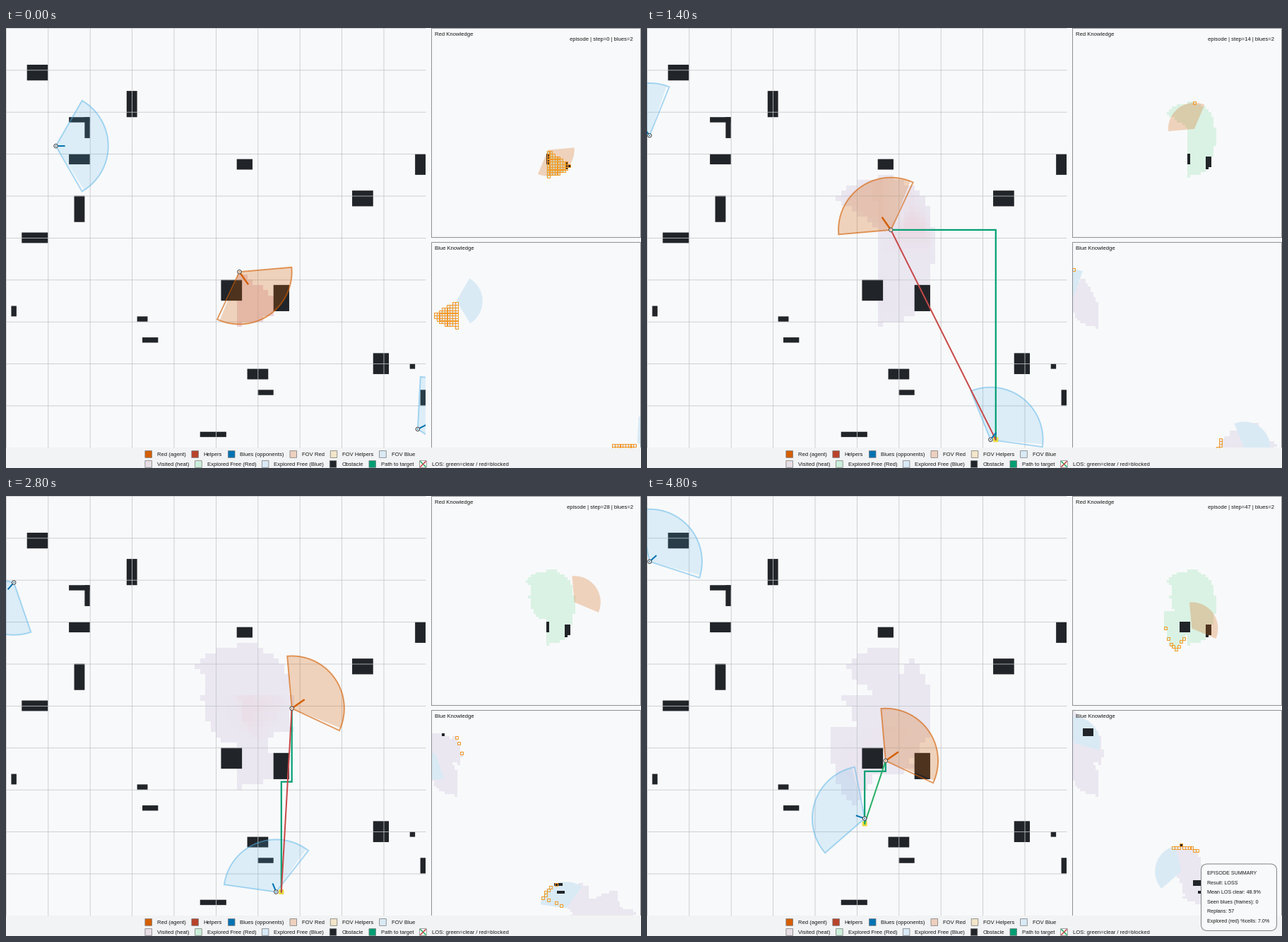
A matplotlib script for the animation above (4900 ms loop, 899 by 623 pixels).

```python
import numpy as np
import matplotlib.pyplot as plt
from matplotlib.animation import FuncAnimation
from matplotlib.colors import to_rgba
from matplotlib.patches import Circle, FancyBboxPatch, Polygon, Rectangle

W, H, DPI = 899, 623, 100
PX = 72 / DPI                     # points per pixel
N, LAST, FRAMES = 80, 47, 49
MAP = 594
CELL, MINI = MAP / N, 297 / N
RANGE = 10
PANEL_X, RED_Y, BLUE_Y = 602.3, 0, 303.2

BG, BAR, GRID, DARK = "#f8f9fa", "#f2f3f4", "#c3c6c9", "#212529"
RED, BLUE, SKY, PATH = "#d55e00", "#0072b2", "#56b4e9", "#009e73"
CLEAR, BLOCKED, ORANGE = "#27b066", "#c94848", "#f39a26"
FRAME = "#808488"
COOL = np.array([234, 232, 242]) / 255
WARM = np.array([235, 213, 221]) / 255

# x, y, width, height in cells
BLOCKS = [
    (4, 7, 4, 3), (23, 12, 2, 5), (12, 17, 4, 1), (15, 17, 1, 4),
    (12, 24, 4, 2), (13, 32, 2, 5), (3, 39, 5, 2), (1, 53, 1, 2),
    (25, 55, 2, 1), (26, 59, 3, 1), (44, 25, 3, 2), (66, 31, 4, 3),
    (78, 24, 2, 4), (41, 48, 4, 4), (51, 49, 3, 5), (46, 65, 4, 2),
    (48, 69, 3, 1), (70, 62, 3, 4), (77, 64, 1, 1), (79, 69, 1, 3),
    (37, 77, 5, 1),
]
walls = np.zeros((N, N), bool)
for bx, by, bw, bh in BLOCKS:
    walls[by:by + bh, bx:bx + bw] = True

# ---------- simulation ----------
MOVES = {"U": (0, -1), "D": (0, 1), "L": (-1, 0), "R": (1, 0)}


def walk(start, heading, plan):
    """Each action is a one-cell move, a 45 degree turn (T) or a wait (.)."""
    pos, head = [np.array(start)], [heading]
    for word in plan.split():
        for _ in range(int(word[1:])):
            pos.append(pos[-1] + MOVES.get(word[0], (0, 0)))
            head.append(head[-1] + 45 * (word[0] == "T"))
    return np.array(pos), np.array(head)


def patrol(*poses):
    """Glide through (step, x, y, heading) poses, turning early in each leg."""
    k, t = np.array(poses), np.arange(LAST + 1)
    i = np.clip(np.searchsorted(k[:, 0], t, "right") - 1, 0, len(k) - 2)
    a, b = k[i], k[i + 1]
    u = (t - a[:, 0]) / (b[:, 0] - a[:, 0])
    pos = a[:, 1:3] + (b - a)[:, 1:3] * u[:, None]
    return np.round(pos).astype(int), a[:, 3] + (b - a)[:, 3] * np.minimum(1, u / 0.7)


red_pos, red_dir = walk((44, 46), 55, "U2 T2 U6 T2 R3 T2 R7 .2 D6 L9 D6")
tracks = [
    patrol((0, 9, 22, 0), (3, 9, 22, -90), (8, 2, 24, -65), (14, 0, 20, -128),
           (22, 0, 20, -66), (28, 1, 16, -229), (36, 0, 10, -130),
           (LAST, 0, 12, -42)),
    patrol((0, 78, 76, -27), (8, 70, 79, -110), (14, 65, 78, -52),
           (22, 57, 76.4, -123), (28, 51, 75, -112), (36, 43.5, 71, -156),
           (LAST, 41, 61, -161)),
]
YY, XX = np.mgrid[:N, :N]


def seen(pos, heading):
    dx, dy = XX - pos[0], YY - pos[1]
    off = np.degrees(np.arctan2(dy, dx)) - (120 - heading)
    off = (off + 180) % 360 - 180
    return (np.hypot(dx, dy) <= RANGE) & (np.abs(off) <= 30)


def explore(*team):
    known, out = np.zeros((N, N), bool), []
    for s in range(LAST + 1):
        view = np.any([seen(p[s], d[s]) for p, d in team], axis=0)
        out.append((known | view, view & ~known))
        known = known | view
    return out


red_known = explore((red_pos, red_dir))
blue_known = explore(*tracks)

heats, heat = [], np.zeros((N, N))
for p, d in zip(red_pos, red_dir):
    heat = heat * 0.95 + seen(p, d)
    heats.append(heat)


def target(s):
    """Last reported cell of the nearest opponent."""
    near = min(tracks, key=lambda t: np.hypot(*(t[0][s] - red_pos[s])))
    return near[0][s - 1]


def find_path(goal, start):
    """Walk from goal to start along the longer axis, sidestepping walls."""
    cur, path = list(goal), [tuple(goal)]
    delta = np.abs(start - goal)
    major = int(delta[1] >= delta[0])
    minor = 1 - major
    for _ in range(300):
        if tuple(cur) == tuple(start):
            break
        nxt = list(cur)
        nxt[major] += np.sign(start[major] - cur[major])
        if nxt == cur or walls[nxt[1], nxt[0]]:
            nxt = list(cur)
            nxt[minor] += np.sign(start[minor] - cur[minor]) or 1
        cur = nxt
        path.append(tuple(cur))
    return np.array(path)


def sight_clear(a, b):
    n = max(int(np.abs(b - a).max()), 1)
    cells = np.array([np.round(a + (b - a) * k / n) for k in range(n + 1)], int)
    return not walls[cells[:, 1], cells[:, 0]].any()


# ---------- stage ----------
plt.rcParams["font.family"] = "Liberation Sans"
fig = plt.figure(figsize=(W / DPI, H / DPI), dpi=DPI, facecolor=BG)
ax = fig.add_axes([0, 0, 1, 1])
ax.axis("off")
ax.set_xlim(0, W)
ax.set_ylim(H, 0)
ax.set_autoscale_on(False)


def box(x, y, w, h, **kw):
    return ax.add_patch(Rectangle((x, y), w, h, snap=False, **kw))


def label(x, y, s, size=7.7, z=20, **kw):
    return ax.text(x, y, s, fontsize=size * PX, va="center_baseline",
                   color="#151515", zorder=z, **kw)


def line(color, width, z, x=(), y=(), **kw):
    return ax.plot(x, y, color=color, lw=width * PX, zorder=z, snap=False, **kw)[0]


def layer(x, y, size, z):
    return ax.imshow(np.zeros((N, N, 4)), extent=(x, x + size, y + size, y),
                     interpolation="nearest", aspect="auto", zorder=z)


def paint(mask, color):
    img = np.zeros((N, N, 4))
    img[mask] = to_rgba(color)
    return img


box(0, MAP, W, H - MAP, fc=BAR, ec="none", zorder=0)
map_bg = box(0, 0, MAP, MAP, fc=BG, ec="none", zorder=0)
red_bg = box(PANEL_X, RED_Y, 297, 297, fc=BG, ec="none", zorder=0)
blue_bg = box(PANEL_X, BLUE_Y, 297, MAP - BLUE_Y, fc=BG, ec="none", zorder=0)

heat_img = layer(0, 0, MAP, 1)
for block in BLOCKS:
    box(*(v * CELL for v in block), fc=DARK, ec="none", zorder=2).set_clip_path(map_bg)
for p in np.arange(10) * MAP / 10 + 0.4:
    line(GRID, 0.8, 3, [p, p], [0, MAP])
    line(GRID, 0.8, 3, [0, MAP], [p, p])


class Wedge:
    """Field of view on the map and on a knowledge panel, plus the agent."""

    def __init__(self, color, alpha, edge_alpha, body, beam, width, top, clip, mini):
        self.top, self.beam = top, beam
        self.fill = self.poly(map_bg, fc=color, ec="none", alpha=alpha, zorder=5)
        self.edge = self.poly(map_bg, fc="none", ec=color, alpha=edge_alpha,
                              lw=1.9 * PX, zorder=6)
        self.mini = self.poly(clip, ec="none", **mini)
        self.ray = line(body, width, 11, solid_capstyle="butt")
        self.ray.set_clip_path(map_bg)
        self.ring = ax.add_patch(Circle((0, 0), 2.7, fc="white", ec="#444444",
                                        lw=PX, zorder=12))
        self.dot = ax.add_patch(Circle((0, 0), 0.9, fc=body, ec="none", zorder=13))

    @staticmethod
    def poly(clip, **kw):
        patch = ax.add_patch(Polygon([(0, 0)] * 3, closed=True, **kw))
        patch.set_clip_path(clip)
        return patch

    @staticmethod
    def fan(c, r, a0, a1):
        a = np.radians(np.linspace(a0, a1, 25))
        arc = np.stack([c[0] + r * np.cos(a), c[1] + r * np.sin(a)], 1)
        return np.vstack([[c], arc])

    def place(self, pos, heading):
        c = (pos + 0.5) * CELL
        m = (pos + 0.5) * MINI + (PANEL_X, self.top)
        a0, a1 = heading - 60, heading + 60
        self.fill.set_xy(self.fan(c, RANGE * CELL, a0, a1 - 3))
        self.edge.set_xy(self.fan(c, RANGE * CELL, a0, a1))
        self.mini.set_xy(self.fan(m, RANGE * MINI, a0, a1 - 2))
        a = np.radians(heading)
        self.ray.set_data([c[0], c[0] + self.beam * np.cos(a)],
                          [c[1], c[1] + self.beam * np.sin(a)])
        self.ring.center = self.dot.center = tuple(c)


class Panel:
    def __init__(self, title, top, free, clip):
        self.top, self.free = top, free
        self.img = layer(PANEL_X, top, N * MINI, 4)
        self.rock = layer(PANEL_X, top, N * MINI, 5)
        self.marks = line(ORANGE, 0, 8, ls="none", marker="s", mfc="none",
                          mec=ORANGE, ms=3.1 * PX, mew=PX)
        for a in (self.img, self.rock, self.marks):
            a.set_clip_path(clip)
        low = min(top + 296.6, MAP)
        line(FRAME, 0.9, 15, [602.5, 602.5, 898.6, 898.6],
             [low, top + 0.4, top + 0.4, low], solid_capstyle="butt")
        label(607, top + 8.3, title)

    def show(self, known, fresh):
        self.img.set_data(paint(known, self.free))
        self.rock.set_data(paint(known & walls, DARK))
        y, x = np.nonzero(fresh)
        self.marks.set_data(PANEL_X + (x + 0.5) * MINI, self.top + (y + 0.5) * MINI)


red_panel = Panel("Red Knowledge", RED_Y, "#daf2e4", red_bg)
blue_panel = Panel("Blue Knowledge", BLUE_Y, "#eae7f0", blue_bg)
line(FRAME, 0.9, 15, [602.5, 898.6], [296.6, 296.6])
status = label(888, 15, "", ha="right")

red = Wedge(RED, 0.25, 0.62, RED, 22, 2.4, RED_Y, red_bg,
            dict(fc=RED, alpha=0.25, zorder=6))
blues = [Wedge(SKY, 0.17, 0.5, BLUE, 13, 2, BLUE_Y, blue_bg,
               dict(fc="#d9eaf5", zorder=4.5)) for _ in tracks]

goal = box(0, 0, 6, 6, fc="#f4e63c", ec="#e9c928", lw=0.8 * PX, zorder=8)
path_line = line(PATH, 2.2, 9, solid_joinstyle="miter")
sight = line(CLEAR, 2, 10)

# ---------- legend ----------
ROWS = [
    [(RED, "Red (agent)"), ("#b8432a", "Helpers"), (BLUE, "Blues (opponents)"),
     ("#eed0be", "FOV Red"), ("#f2e5c8", "FOV Helpers"), ("#d9eaf5", "FOV Blue")],
    [("#e7dee5", "Visited (heat)"), ("#cbeeda", "Explored Free (Red)"),
     ("#d8e9f7", "Explored Free (Blue)"), (DARK, "Obstacle"),
     (PATH, "Path to target"), ("white", "LOS: green=clear / red=blocked")],
]
for row, items in enumerate(ROWS):
    x, y = 201.7, 603.5 + 14 * row
    for color, name in items:
        box(x - 4.8, y - 4.8, 9.6, 9.6, fc=color, ec="#77797b", lw=0.75 * PX, zorder=15)
        mark, text = x, label(x + 12.2, y, name)
        x += text.get_window_extent().width + 25.2
for sign, color in ((1, CLEAR), (-1, BLOCKED)):
    line(color, 1.6, 16, [mark - 3.5, mark + 3.5], [y - 3.5 * sign, y + 3.5 * sign])

# ---------- closing card ----------
SUMMARY = ["EPISODE SUMMARY", "Result: LOSS", "Mean LOS clear: 48.9%",
           "Seen blues (frames): 0", "Replans: 57",
           "Explored (red) %cells: 7.0%"]
card = [ax.add_patch(FancyBboxPatch(
    (784.5, 521), 107, 94.5, boxstyle="round,pad=0,rounding_size=9",
    fc=BG, ec=FRAME, lw=PX, zorder=30))]
card += [label(793, 534 + 13.4 * i, s, size=7.2, z=31)
         for i, s in enumerate(SUMMARY)]


def draw(i):
    s = min(i, LAST)
    status.set_text(f"episode | step={s} | blues=2")

    # warm tint for often-seen cells, cooling as the run goes on
    v = (heats[s] / heats[s].max()) ** 2 * (1 - 0.8 * s / LAST)
    shade = np.ones((N, N, 4))
    shade[..., :3] = COOL + (WARM - COOL) * v[..., None]
    shade[..., 3] = heats[s] > 0.35
    heat_img.set_data(shade)

    red.place(red_pos[s], red_dir[s])
    for b, (pos, heading) in zip(blues, tracks):
        b.place(pos[s], heading[s])
    red_panel.show(*red_known[s])
    blue_panel.show(*blue_known[s])

    for a in (goal, path_line, sight):
        a.set_visible(s > 0)
    if s > 0:
        t, r = target(s), red_pos[s]
        a, b = (r + 0.5) * CELL, (t + 0.5) * CELL
        goal.set_xy(b - 3)
        path_line.set_data(*((find_path(t, r) + 0.5) * CELL).T)
        sight.set_data([a[0], b[0]], [a[1], b[1]])
        sight.set_color(CLEAR if sight_clear(r, t) else BLOCKED)

    for a in card:
        a.set_visible(i == FRAMES - 1)
    return []


anim = FuncAnimation(fig, draw, frames=FRAMES, interval=100,
                     init_func=lambda: [], repeat=True, repeat_delay=0)
plt.show()
```
